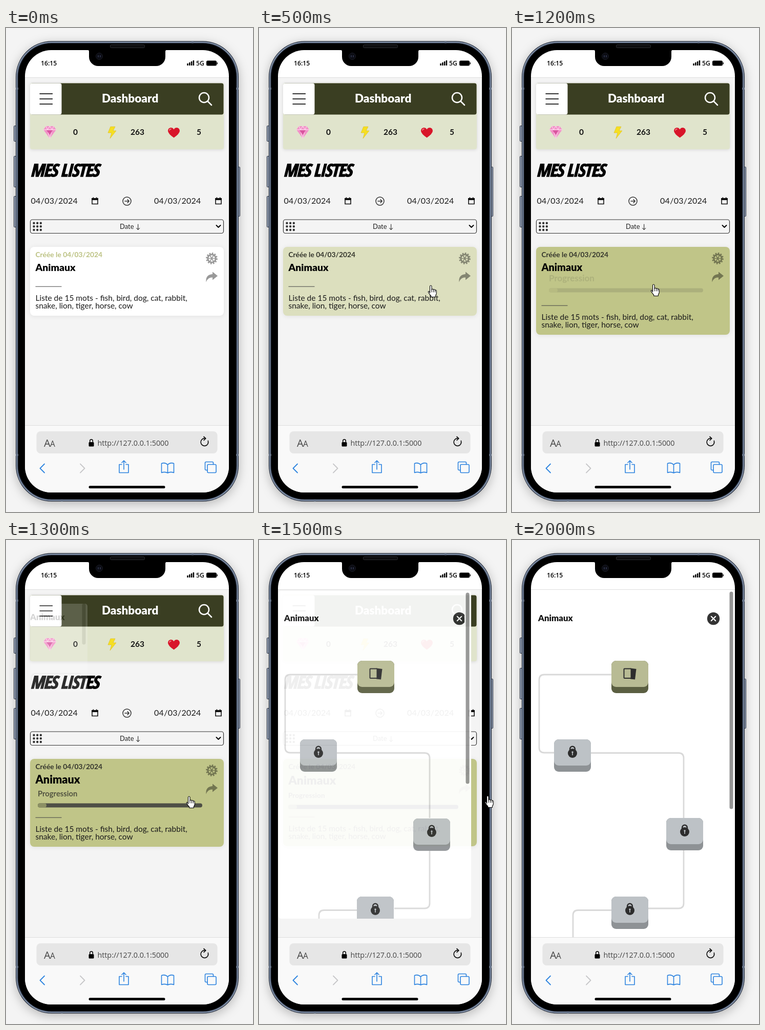
Recreate the animation shown at these times as an HTML page. Size 482 by 942 pixels, loop 2800 ms.

```html
<!DOCTYPE html>
<html lang="fr">
<head>
<meta charset="utf-8">
<title>Mes listes</title>
<style>
html, body { margin: 0; width: 100%; height: 100%; overflow: hidden; background: #f4f4f4; }
.stage { position: relative; width: 482px; height: 942px; overflow: hidden; }
.stage svg, .layer { position: absolute; left: 0; top: 0; width: 482px; height: 942px; }
svg { font-family: Lato, "Open Sans", sans-serif; }
.ui { font-family: "Open Sans", "Noto Sans", sans-serif; }
.bold { font-weight: 700; }
.black { font-weight: 900; }
.heading {
  font: italic 800 34px "Open Sans Condensed", "Noto Sans Condensed", "Open Sans", sans-serif;
  font-stretch: 75%;
  letter-spacing: -1.2px;
  stroke: #000;
  stroke-width: 1.4px;
}
.line { fill: none; stroke-linecap: round; stroke-linejoin: round; }
.phone { filter: drop-shadow(0 5px 10px rgba(0, 0, 0, .25)); }
.soft { filter: drop-shadow(0 1px 3px rgba(0, 0, 0, .12)); }

/* One loop in hard steps of 100 ms (1/28 of the cycle). */
.cursor, .card, .stamp, .title, .details, .progress, .label, .bar,
.modal, .map, .plan, .third, .fourth, .thumb {
  animation: 2.8s step-end infinite;
}
.cursor { animation-name: cursor; }
.card { animation-name: card; }
.stamp { animation-name: stamp; }
.title { animation-name: title; }
.details { animation-name: details; }
.progress { animation-name: progress; }
.label { animation-name: label; }
.bar { animation-name: bar; }
.modal { animation-name: modal; }
.map { animation-name: map; }
.plan { animation-name: plan; }
.third { animation-name: third; }
.fourth { animation-name: fourth; }
.thumb { animation-name: thumb; }

@keyframes cursor {
  0% { transform: translate(520px, 515px); }
  3.57% { transform: translate(474px, 514px); }
  7.14% { transform: translate(445px, 514px); }
  10.71% { transform: translate(412px, 513px); }
  14.28% { transform: translate(379px, 513px); }
  17.85% { transform: translate(338px, 512px); }
  21.42% { transform: translate(299px, 511px); }
  25% { transform: translate(279px, 510px); }
  46.42% { transform: translate(360px, 510px); }
  50% { transform: translate(429px, 509px); }
  53.57% { transform: translate(449px, 509px); }
  57.14%, 100% { transform: translate(520px, 509px); }
}
@keyframes card {
  0% { fill: #fff; height: 134px; }
  14.28% { fill: #f6f7ed; height: 134px; }
  17.85% { fill: #dcdfbe; height: 134px; }
  21.42% { fill: #c4c98f; height: 134px; }
  25% { fill: #c0c588; height: 134px; }
  42.85% { fill: #c0c588; height: 171px; }
  50%, 100% { fill: #c0c588; height: 170px; }
}
@keyframes stamp {
  0% { fill: #bcc283; }
  10.71% { fill: #76794f; }
  14.28%, 100% { fill: #35362d; }
}
@keyframes title {
  0% { font-size: 19.4px; transform: none; }
  42.85% { font-size: 19.8px; transform: none; }
  46.42% { font-size: 21.6px; transform: translateY(1px); }
  50%, 100% { font-size: 23px; transform: translateY(3px); }
}
@keyframes details {
  0% { transform: none; }
  42.85% { transform: translateY(37px); }
  50%, 100% { transform: translateY(36px); }
}
@keyframes progress {
  0% { opacity: 0; }
  42.85% { opacity: .12; transform: translate(72px, 493px); }
  46.42% { opacity: .7; transform: translate(62px, 499px); }
  50%, 100% { opacity: 1; transform: translate(57px, 502px); }
}
@keyframes label {
  0% { font-size: 17px; }
  46.42% { font-size: 14.8px; }
  50%, 100% { font-size: 13.7px; }
}
@keyframes bar {
  0% { width: 301px; }
  46.42% { width: 321px; }
  50%, 100% { width: 332px; }
}
@keyframes modal {
  0% { opacity: 0; clip-path: inset(97px 47px 169px 37px); }
  46.42% { opacity: .18; clip-path: inset(124px 323px 647px 48px round 5px); }
  50% { opacity: .71; clip-path: inset(107px 147px 342px 41px round 5px); }
  53.57% { opacity: .94; clip-path: inset(99px 68px 205px 38px round 5px); }
  57.14%, 100% { opacity: 1; clip-path: inset(97px 47px 169px 37px round 0 0 6px 6px); }
}
@keyframes map {
  0% { clip-path: inset(97px 60px 169px 37px); }
  46.42% { clip-path: inset(124px 336px 647px 48px); }
  50% { clip-path: inset(107px 160px 342px 41px); }
  53.57% { clip-path: inset(99px 81px 205px 38px); }
  57.14%, 100% { clip-path: inset(97px 60px 169px 37px); }
}
@keyframes plan {
  0% { transform: translate(-4px, -2px); }
  50% { transform: translate(-3px, -1px); }
  53.57% { transform: translate(-2px, 0); }
  57.14% { transform: translate(-1px, 0); }
  60.71%, 100% { transform: none; }
}
@keyframes third {
  0% { transform: translate(12px, 6px); }
  53.57% { transform: translate(2px, 1px); }
  57.14%, 100% { transform: none; }
}
@keyframes fourth {
  0% { transform: translate(-1px, 0); }
  64.28%, 100% { transform: none; }
}
@keyframes thumb {
  0% { transform: translate(-276px, 23px); height: 80px; }
  50% { transform: translate(-100px, 9px); height: 224px; }
  53.57% { transform: translate(-21px, 2px); height: 372px; }
  57.14%, 100% { transform: none; height: 423px; }
}
</style>
</head>
<body>
<div class="stage">

<svg viewBox="0 0 482 942">
  <defs>
    <g id="calendar">
      <path d="M1 2.5h11v10.500H1z" fill="none" stroke="#111" stroke-width="1.6"/>
      <path d="M0 1.500h13v4H0zM2.500 0h1.700v2H2.500zM8.800 0h1.700v2H8.800z" fill="#111"/>
    </g>
    <g id="padlock">
      <circle cy="2" r="9" fill="#2d2d2d"/>
      <path class="line" d="M-4.800-3V-6.500a4.800 4.800 0 0 1 9.600 0V-3" stroke="#2d2d2d" stroke-width="2.600"/>
      <path d="M-1.800 0a1.800 1.800 0 1 1 3.600 0L.8 1.500V6H-.8V1.500z" fill="#bdc2c6"/>
    </g>
    <g id="lockedKey">
      <rect width="72" height="63" rx="9" fill="#8e9295"/>
      <rect width="72" height="51" rx="9" fill="#bdc2c6"/>
      <use href="#padlock" x="36" y="25"/>
    </g>
  </defs>

  <!-- phone body -->
  <g fill="#a3b0c6" stroke="#2c3546">
    <rect x="15.500" y="190.500" width="5" height="30" rx="1"/>
    <rect x="15.500" y="249.500" width="5" height="60" rx="1"/>
    <rect x="15.500" y="327.500" width="5" height="60" rx="1"/>
    <rect x="451.500" y="270.500" width="5" height="96" rx="1"/>
  </g>
  <rect class="phone" x="19" y="25.500" width="435" height="896" rx="70" fill="#222a38"/>
  <rect x="21.300" y="27.800" width="430.400" height="891.400" rx="67.700" fill="none" stroke="#8190a8" stroke-width="2.200"/>
  <path d="M19 118h5M19 831h5M449 118h5M449 831h5M364 25.500v4M109 917.500v4" stroke="#68758a" stroke-width="4"/>
  <rect x="24" y="30" width="425" height="887" rx="65"/>
  <rect x="37" y="43" width="398" height="861" rx="51" fill="#fff"/>
  <path d="M37 97h398v676H37z" fill="#f4f4f4"/>
  <path d="M37 773h398v80a51 51 0 0 1-51 51H88a51 51 0 0 1-51-51z" fill="#f9f9f9"/>
  <path d="M37 96.500h398M37 773.500h398" stroke="#dedede"/>
  <path d="M159 42q3 1 3 4v10a18 18 0 0 0 18 18h113a18 18 0 0 0 18-18V46q0-3 3-4z"/>
  <rect x="203.500" y="32.500" width="67" height="6" rx="2" fill="#0d0d0f" stroke="#2b2d32"/>
  <circle cx="182" cy="55" r="6.500" fill="#0b0c13" stroke="#1a1c26"/>
  <path d="M180 53v4M184 53v4" stroke="#343a55" stroke-width="1.500"/>

  <!-- status bar -->
  <g class="ui" font-size="12.200" font-weight="600">
    <text x="68" y="72.500">16:15</text>
    <text x="371" y="73">5G</text>
    <path d="M354.500 73v-4M358.300 73v-6M362.100 73v-8M365.900 73v-10" stroke="#000" stroke-width="2.500"/>
    <rect x="391" y="63.500" width="20" height="10" rx="2.500"/>
    <path d="M412.300 67v3.500" stroke="#000" stroke-width="1.500"/>
  </g>

  <!-- header -->
  <rect class="soft" x="47" y="107" width="378" height="129" rx="4" fill="#e0e4cc"/>
  <rect x="47.500" y="107.500" width="377" height="61" rx="4" fill="#3a3e22"/>
  <rect x="47" y="107.500" width="61.500" height="61" rx="4" fill="#fff"/>
  <path d="M65.500 128h25.500M65.500 138h25.500M65.500 148h25.500" stroke="#333" stroke-width="2"/>
  <text class="black" x="187" y="144.500" font-size="22.500" fill="#fff">Dashboard</text>
  <g class="line" stroke="#fff" stroke-width="2.500"><circle cx="386.500" cy="135.500" r="9.500"/><path d="M393.500 142.500l7.500 7.500"/></g>

  <!-- counters -->
  <path d="M78 191h15l5 7-12.500 17L73 198z" fill="#f291c8"/>
  <path class="line" d="M73 198h25M78 191l3 7 4.500 17L90 198l3-7M81 198l4.500-7 4.500 7" stroke="#fbd0e8" stroke-width="1.300"/>
  <path d="M79 199h12l-5.500 9z" fill="#d9559f"/>
  <path d="M204 192h9l-4 8h6l-12 15 3-11h-7z" fill="#f6df22" stroke="#d9b91c" stroke-width=".6"/>
  <path d="M327.500 213.500q-11-7.500-11.500-13c0-7.500 9-8.500 11.500-3 2.500-5.500 11.500-4.500 11.500 3q-.5 5.500-11.500 13z" fill="#d8152a"/>
  <path class="line" d="M319 199q.500-2.500 3-2.500" stroke="#f48a90" stroke-width="1.500"/>
  <g class="bold" font-size="15.500" fill="#111">
    <text x="131" y="207.500">0</text><text x="243" y="207.500">263</text><text x="372" y="207.500">5</text>
  </g>

  <!-- filters -->
  <text class="heading" x="47.500" y="288.700">MES LISTES</text>
  <g font-size="16" letter-spacing=".3" fill="#1c1c1c">
    <text x="48.500" y="341.500">04/03/2024</text><text x="289" y="341.500">04/03/2024</text>
  </g>
  <use href="#calendar" x="167" y="329.500"/>
  <use href="#calendar" x="408" y="329.500"/>
  <g class="line" stroke="#333" stroke-width="1.500">
    <circle cx="236" cy="337" r="8"/><path d="M232 337h8M237 333.800l3.200 3.200-3.200 3.200"/>
    <rect x="47.500" y="373" width="377" height="26.500" rx="4" stroke-width="1.200"/>
    <path d="M410.500 384l4 4 4-4" stroke="#000" stroke-width="2"/>
  </g>
  <path class="line" d="M54.500 379.700h14M54.500 386.300h14M54.500 393h14" stroke="#333" stroke-width="4.400" stroke-dasharray="0 6.700"/>
  <text x="222" y="390.500" font-size="13" fill="#222">Date ↓</text>

  <!-- list card -->
  <rect class="card" x="47" y="426" width="378" height="134" rx="8" style="filter:drop-shadow(0 1px 4px rgba(0,0,0,.08))"/>
  <text class="bold stamp" x="57.500" y="446" font-size="13.800">Créée le 04/03/2024</text>
  <text class="black title" x="57.500" y="473">Animaux</text>
  <g opacity=".4">
    <g class="line" stroke="#000" style="stroke-linecap:butt">
      <circle cx="401.500" cy="448.500" r="7.700" stroke-width="3"/>
      <circle cx="401.500" cy="448.500" r="9.900" stroke-width="3" stroke-dasharray="2.592"/>
      <path d="M394 448.500h15M397.700 442l7.600 13M405.300 442l-7.600 13" stroke-width="1.700"/>
    </g>
    <path d="M403 474.500l10 8-10 8v-5q-9-.5-12.500 9-1.500-14.500 12.500-15.500z"/>
  </g>
  <g class="progress">
    <text class="bold label" fill="#222">Progression</text>
    <rect class="bar" y="13.500" width="332" height="8" rx="4" fill="#1d1d2a"/>
    <rect y="13.500" width="17" height="8" rx="4" fill="#777a55"/>
  </g>
  <g class="details" font-size="15.500" fill="#1a1a1a">
    <path d="M57.500 503.200h51" stroke="#444"/>
    <text x="57.500" y="531">Liste de 15 mots - fish, bird, dog, cat, rabbit,</text>
    <text x="57.500" y="546.300">snake, lion, tiger, horse, cow</text>
  </g>

  <!-- browser bar -->
  <rect x="59.500" y="785" width="353" height="43" rx="8" fill="#e6e6e6"/>
  <g class="ui" fill="#444">
    <text x="74" y="814.500" font-size="20">A</text><text x="86" y="814.500" font-size="15.500">A</text>
    <text x="178.500" y="813" font-size="14.300">http://127.0.0.1:5000</text>
  </g>
  <rect x="161.500" y="806" width="10" height="8.500" rx="1.500"/>
  <path class="line" d="M163.700 806v-2.500a2.800 2.800 0 0 1 5.600 0v2.500" stroke="#000" stroke-width="1.500"/>
  <path class="line" d="M394.300 803.500a7.300 7.300 0 1 1-6.300-4.800M386 795.500l3.800 3.400-3.800 3.400" stroke="#111" stroke-width="1.700"/>
  <g class="line" stroke="#2b82df" stroke-width="1.800">
    <path d="M75 848.500l-8.500 8.500 8.500 8.500"/>
    <path d="M145 848.500l8.500 8.500-8.500 8.500" stroke="#c6c6c8"/>
    <path d="M226 849.500h-5v16h18v-16h-5M230 859v-16.500M226 846l4-4 4 4" stroke-width="1.600"/>
    <path d="M315.500 850q-5-5-12-2.500v18q7-2.500 12 .500 5-3 12-.500v-18q-7-2.500-12 2.500zv16" stroke-width="1.600"/>
    <path d="M393 860.500h-2.500q-2 0-2-2v-12q0-2 2-2h12q2 0 2 2v3" stroke-width="1.600"/>
    <rect x="393" y="849.500" width="17" height="16" rx="2" stroke-width="1.600"/>
  </g>
  <rect x="161.500" y="891" width="149" height="5" rx="2.500"/>
</svg>

<!-- level map -->
<div class="layer modal">
  <svg viewBox="0 0 482 942">
    <path d="M37 97h398v676H37z" fill="#fff"/>
    <rect class="thumb" x="424.500" y="100.500" width="7" height="423" rx="3.500" fill="#949494"/>
  </svg>
  <div class="layer map">
    <svg viewBox="0 0 482 942">
      <g class="plan">
        <path d="M194 262H63q-10 0-10 10v132q0 10 10 10h19M154 414.500h171q10 0 10 10V541M335 604v103q0 10-10 10h-59M194 720.500h-65q-10 0-10 10V773" fill="none" stroke="#d9d9d9" stroke-width="2.800"/>
        <text class="black" x="51" y="158" font-size="16.800" fill="#111">Animaux</text>
        <circle cx="393" cy="153" r="12.200" fill="#333"/>
        <path class="line" d="M388.800 148.800l8.400 8.400M397.200 148.800l-8.400 8.400" stroke="#fff" stroke-width="2.200"/>
        <rect x="194" y="235" width="72" height="63" rx="9" fill="#5b5f42"/>
        <rect x="194" y="235" width="72" height="51" rx="9" fill="#b8bb94"/>
        <path d="M231 249.500l11.500 1.500-2.500 20.500-9-1z" fill="#2d2d2d"/>
        <rect x="218.500" y="250.500" width="14" height="18.500" rx="1" fill="#b8bb94" stroke="#2d2d2d" stroke-width="2"/>
        <use href="#lockedKey" x="82" y="388"/>
        <use class="third" href="#lockedKey" x="301" y="541"/>
        <use class="fourth" href="#lockedKey" x="194" y="694"/>
      </g>
    </svg>
  </div>
</div>

<svg viewBox="0 0 482 942">
  <g class="cursor">
    <path class="line" d="M-4.500 3.500V-9q0-2 1.700-2T-1-9v6.500q.300-1.500 1.800-1.500t1.700 2q.300-1.200 1.600-1.200T5.700-1.300q.300-.9 1.300-.7 1.300.2 1.300 2V4q0 2.500-2 5v2.500h-8.500V9.500Q-5 7-7.500 2.500q-.7-1.700.6-2.300 1.100-.3 2.400 3.300z" style="fill:#fff" stroke="#000" stroke-width="1.100"/>
    <path class="line" d="M-1-2.500V2M2.500-2V2M5.700-1.300V2" stroke="#000"/>
  </g>
</svg>

</div>
</body>
</html>
```
